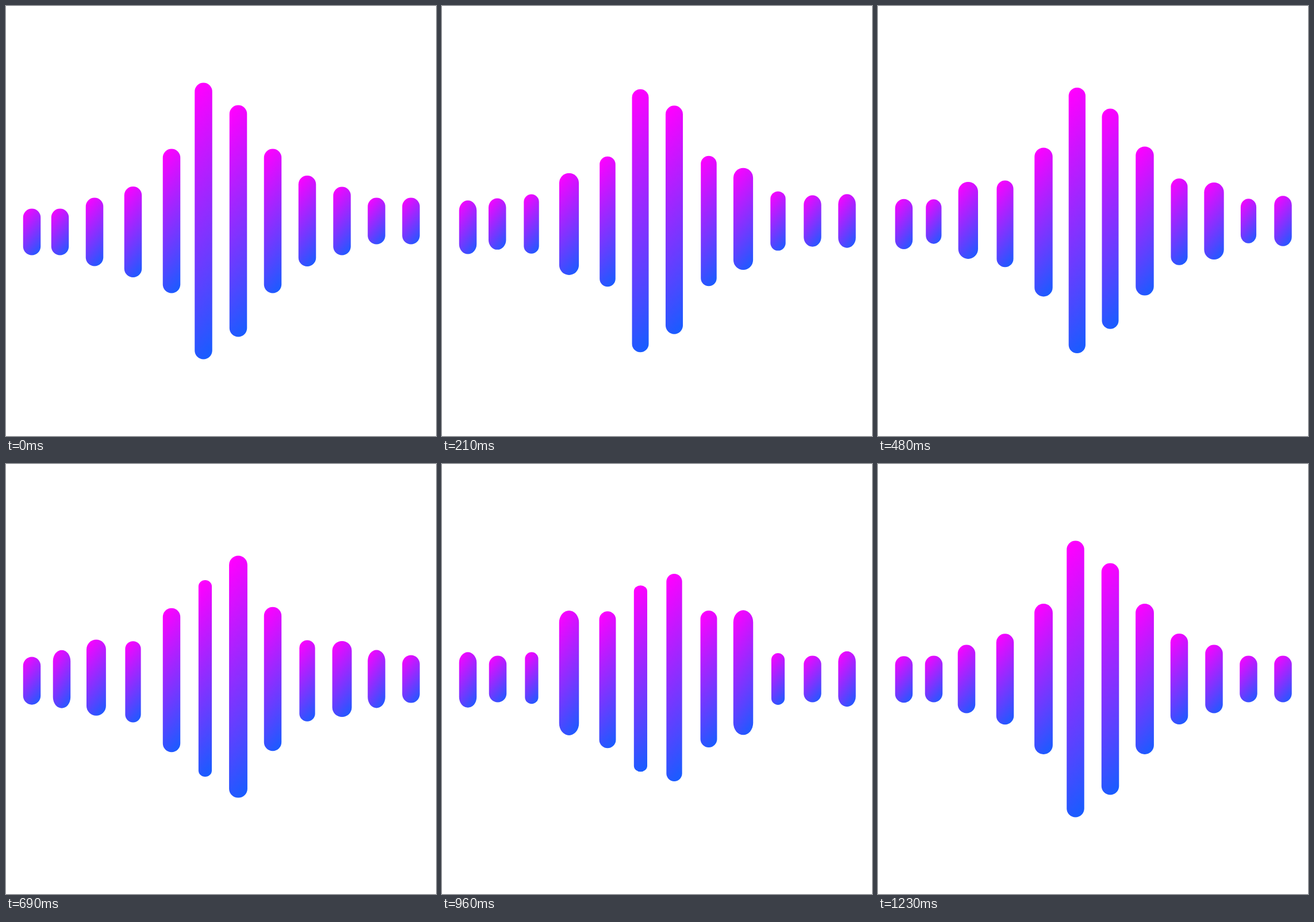
An HTML page with a canvas for the animation above (1260 ms loop, 748 px wide and 748 px high).

```html
<!DOCTYPE html>
<html lang="en">
<head>
<meta charset="utf-8">
<title>Sound wave</title>
<style>
  html, body { margin: 0; width: 100%; height: 100%; overflow: hidden; background: #fff; }
  canvas { display: block; }
</style>
</head>
<body>
<canvas width="748" height="748"></canvas>
<script>
const ctx = document.querySelector('canvas').getContext('2d');
const { sin, cos, min, max, exp, PI } = Math;
const LOOP = 1260, STEP = 30, END = LOOP - STEP;
const WIDTH = 30.5, AXIS = 374, DROP = 19, TILT = 0.85;

// Eases a bar's extra height through [time, pixels] peaks, from rest to rest.
function swell(...peaks) {
  const keys = [[0, 0], ...peaks, [END, 0]];
  return t => {
    const i = max(1, keys.findIndex(key => key[0] >= t));
    const [t0, a] = keys[i - 1], [t1, b] = keys[i];
    const u = (t - t0) / (t1 - t0);
    return a + (b - a) * u * u * (3 - 2 * u);
  };
}

// How a bar's width follows its vertical scale.
const grow = s => min(1.13, max(0.76, s));
const pinch = s => min(1, s ** 2.5);

// Mirrored bars share a shape.
const edge = { height: 81, extra: t => 16 * sin(2 * PI * t / END) ** 2, widen: pinch };
edge.extra = t => 16 * sin(PI * t / (END / 2)) ** 2;
const outer = { height: 81, extra: swell([90, 22], [370, -12.5], [690, 20], [960, 0]), widen: pinch };
const mid = { height: 119, extra: swell([90, -22], [600, 21], [960, -29]) };
const inner = { height: 158, extra: swell([240, 20], [640, -22], [960, 59]), lift: 0.19 };
const near = { height: 251, extra: swell([90, -31], [330, -18], [480, 8], [960, -13], [END, 11]) };
const peak = { height: 481, extra: swell([90, -25], [480, -19], [690, -139], [960, -157]) };
const second = { height: 403, extra: swell([90, 10], [380, -32], [690, 18], [960, -42]) };

// settle: time for a dropped bar to rise to the axis; sway: slow drift and return.
const bars = [
  { ...edge, x: 45, settle: 380 },
  { ...outer, x: 97, settle: 160, slide: -3 },
  { ...mid, x: 154, settle: 200, swayX: 3, swayY: -3 },
  { ...inner, x: 221, settle: 280 },
  { ...near, x: 288, swayY: 2 },
  { ...peak, x: 343.5, swayX: 3, swayY: -1 },
  { ...second, x: 404, swayY: -4 },
  { ...near, x: 464 },
  { ...inner, x: 524 },
  { ...mid, x: 584.5 },
  { ...outer, x: 644.5 },
  { ...edge, x: 704.5 },
];

function gradient(height) {
  const dx = sin(TILT), dy = cos(TILT);
  const reach = (WIDTH * dx + height * dy) * 0.47;
  const g = ctx.createLinearGradient(-dx * reach, -dy * reach, dx * reach, dy * reach);
  g.addColorStop(0, '#ff00ff');
  g.addColorStop(1, '#1a5cff');
  return g;
}

function drawBar(bar, t) {
  const { x, height, extra, widen = grow, lift = 0, settle, slide = 0, swayX = 0, swayY = 0 } = bar;
  const more = extra(t), scale = 1 + more / height;
  const fall = settle ? exp(-t / settle) : 0;
  const sway = sin(PI * t / END);
  ctx.save();
  ctx.translate(x + slide * fall + swayX * sway, AXIS + DROP * fall + swayY * sway - lift * more);
  ctx.scale(widen(scale), scale);
  ctx.fillStyle = gradient(height);
  ctx.beginPath();
  ctx.roundRect(-WIDTH / 2, -height / 2, WIDTH, height, WIDTH / 2);
  ctx.fill();
  ctx.restore();
}

const start = performance.now();

function draw() {
  const elapsed = (performance.now() - start) % LOOP;
  const t = Math.floor(elapsed / STEP) * STEP;
  ctx.clearRect(0, 0, 748, 748);
  bars.forEach(bar => drawBar(bar, t));
  requestAnimationFrame(draw);
}
draw();
</script>
</body>
</html>
```
